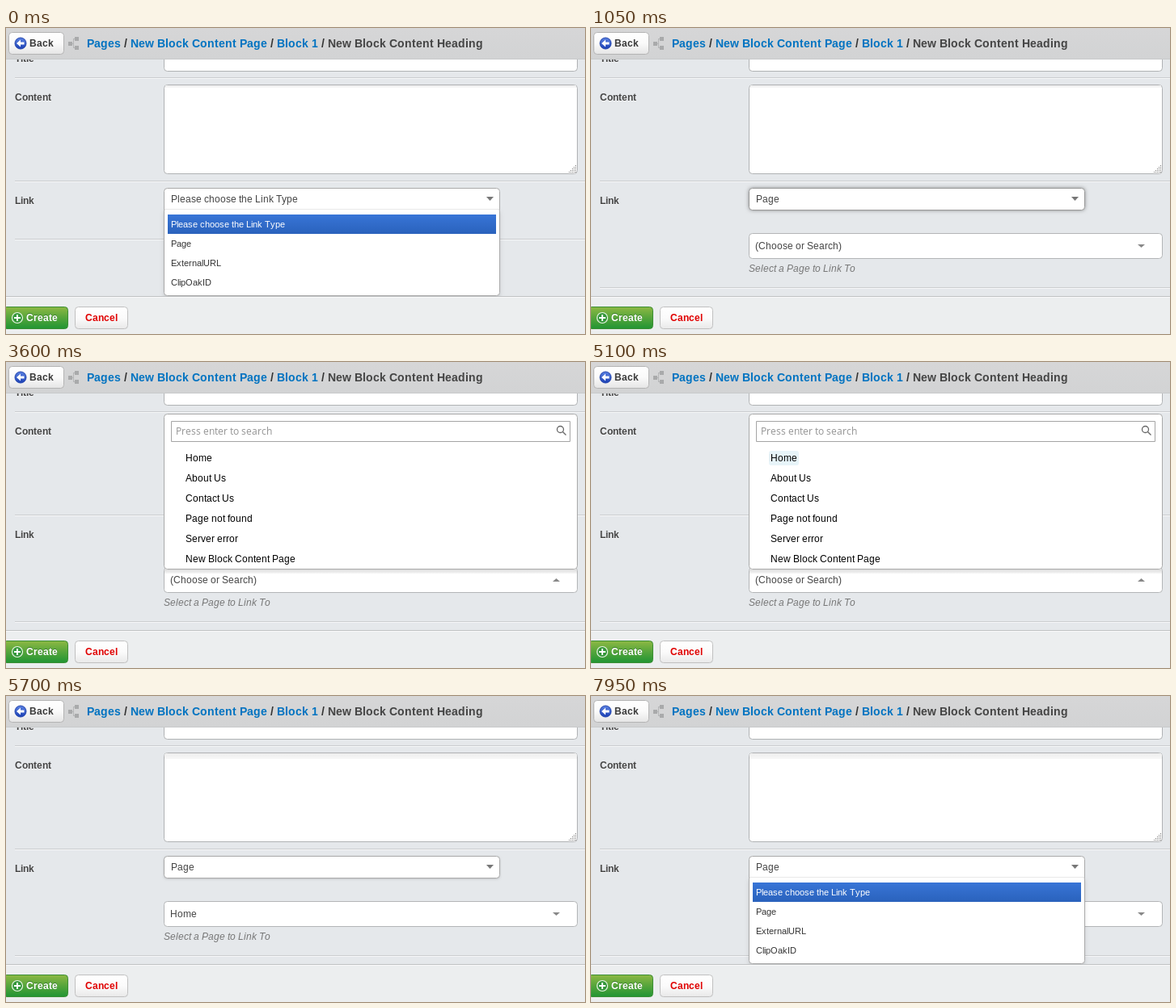
An HTML page with a canvas that plays this animation: 716x379 px, repeating every 8000 ms.

```html
<!DOCTYPE html>
<html lang="en">
<head>
<meta charset="utf-8">
<title>Link field</title>
<style>
html, body { margin: 0; width: 100%; height: 100%; overflow: hidden; background: #e5e8eb; }
canvas { display: block; }
</style>
</head>
<body>
<canvas id="stage" width="716" height="379"></canvas>
<script>
const ctx = document.getElementById('stage').getContext('2d');
const LOOP = 8000;
const SANS = '"Liberation Sans", Arial, sans-serif';
const OPEN = '"Open Sans", sans-serif';
const OPTIONS = ['Please choose the Link Type', 'Page', 'ExternalURL', 'ClipOakID'];
const PAGES = ['Home', 'About Us', 'Contact Us', 'Page not found', 'Server error', 'New Block Content Page'];

// Each step holds from its time until the next one.
const STEPS = [
  { at: 0, menu: 0, value: 0 },
  { at: 450, menu: 1, value: 0 },
  { at: 1050, value: 1, focus: true, page: '(Choose or Search)' },
  { at: 3600, value: 1, page: '(Choose or Search)', tree: -1 },
  { at: 4350, value: 1, page: '(Choose or Search)', tree: 4 },
  { at: 4500, value: 1, page: '(Choose or Search)', tree: 3 },
  { at: 4650, value: 1, page: '(Choose or Search)', tree: 2 },
  { at: 4800, value: 1, page: '(Choose or Search)', tree: 1 },
  { at: 4950, value: 1, page: '(Choose or Search)', tree: -1 },
  { at: 5100, value: 1, page: '(Choose or Search)', tree: 0 },
  { at: 5700, value: 1, page: 'Home', shaded: true },
  { at: 7500, menu: 1, value: 1, page: 'Home', shaded: true },
  { at: 7950, menu: 0, value: 1, page: 'Home', shaded: true }
];

function rect(x, y, w, h, color) {
  ctx.fillStyle = color;
  ctx.fillRect(x, y, w, h);
}

function fade(y0, y1, ...colors) {
  const g = ctx.createLinearGradient(0, y0, 0, y1);
  colors.forEach((c, i) => g.addColorStop(i / (colors.length - 1), c));
  return g;
}

function box(x, y, w, h, fill, border, radius = 4) {
  ctx.beginPath();
  ctx.roundRect(x + 0.5, y + 0.5, w - 1, h - 1, radius);
  ctx.fillStyle = fill;
  ctx.fill();
  ctx.shadowColor = 'transparent';
  if (border) {
    ctx.lineWidth = 1;
    ctx.strokeStyle = border;
    ctx.stroke();
  }
}

function shadow(color, blur, dy = 0) {
  ctx.shadowColor = color;
  ctx.shadowBlur = blur;
  ctx.shadowOffsetY = dy;
}

function shape(color, points) {
  ctx.beginPath();
  points.forEach(([x, y]) => ctx.lineTo(x, y));
  ctx.closePath();
  ctx.fillStyle = color;
  ctx.fill();
}

// Letters advance by whole pixels; returns the end position.
function text(str, x, y, color, style = '12px', family = SANS) {
  ctx.font = style + ' ' + family;
  ctx.fillStyle = color;
  for (const ch of str) {
    ctx.fillText(ch, x, y);
    x += Math.round(ctx.measureText(ch).width);
  }
  return x;
}

function textWidth(str) {
  ctx.font = '12px ' + SANS;
  return [...str].reduce((w, ch) => w + Math.round(ctx.measureText(ch).width), 0);
}

function label(str, y) {
  text(str, 11, y + 1, '#f8f9fa', 'bold 12px');
  text(str, 11, y, '#444', 'bold 12px');
}

function rule(y) {
  rect(11, y, 705, 1, '#cbcdcf');
  rect(11, y + 1, 705, 1, '#f6f7f8');
}

function arrow(x, y, w, h, color, up) {
  const [base, tip] = up ? [y + h, y] : [y, y + h];
  shape(color, [[x, base], [x + w, base], [x + w / 2, tip]]);
}

function header() {
  rect(0, 0, 716, 38, fade(0, 38, '#d6d6d7', '#d2d3d4'));
  rect(0, 38, 716, 1, '#c8cacb');
  box(3, 5, 69, 28, fade(5, 33, '#fff', '#fafafa', '#e4e4e4'), '#b4b4b4');
  ctx.beginPath();
  ctx.arc(18, 19, 7, 0, 7);
  ctx.fillStyle = fade(12, 26, '#5b82e2', '#1a3fb4');
  ctx.fill();
  ctx.lineWidth = 1;
  ctx.strokeStyle = '#2546ae';
  ctx.stroke();
  shape('#fff', [[13, 19], [18, 14.5], [18, 17.5], [22.5, 17.5], [22.5, 20.5], [18, 20.5], [18, 23.5]]);
  text('Back', 29, 23, '#393939', 'bold 12px');

  rect(77, 17, 5, 5, '#a9aaab');
  rect(85, 11, 5, 5, '#a9aaab');
  rect(85, 22, 5, 5, '#a9aaab');
  rect(82, 19, 2, 1, '#b4b5b6');
  rect(83, 13, 1, 12, '#b4b5b6');
  rect(83, 13, 2, 1, '#b4b5b6');
  rect(83, 24, 2, 1, '#b4b5b6');

  let x = 100;
  for (const crumb of ['Pages', 'New Block Content Page', 'Block 1']) {
    x = text(crumb, x, 24, '#0073c1', 'bold 14px');
    x = text(' / ', x, 24, '#333', 'bold 14px');
  }
  text('New Block Content Heading', x, 24, '#444', 'bold 14px');
}

function footer() {
  rect(0, 332, 716, 47, '#eceeef');
  rect(0, 332, 716, 1, '#bfc1c3');
  rect(0, 333, 716, 1, '#f9f9f9');
  box(-4, 345, 81, 28, fade(345, 373, '#8fb944', '#55a53b', '#1f9433'), '#3c8f35');
  ctx.beginPath();
  ctx.arc(14, 359, 6.5, 0, 7);
  ctx.fillStyle = '#35983a';
  ctx.fill();
  ctx.lineWidth = 1.2;
  ctx.strokeStyle = '#eaf5e6';
  ctx.stroke();
  rect(10, 358, 8, 2, '#fff');
  rect(13, 355, 2, 8, '#fff');
  text('Create', 25, 362, '#3b7d2c', 'bold 12px');
  text('Create', 25, 363, '#fff', 'bold 12px');
  box(85, 345, 66, 28, fade(345, 373, '#fff', '#fbfbfb', '#e8e8e8'), '#c0c0c0');
  text('Cancel', 98, 363, '#e00000', 'bold 12px');
}

function textarea(shaded) {
  box(195, 70, 512, 111, '#fff', '#b0b2b4');
  rect(197, 71, 508, 3, fade(71, 74, '#ececec', '#f8f8f8'));
  if (shaded) rect(196, 72, 510, 6, fade(72, 78, '#efefef', '#f8f8f8'));
  for (let row = 0; row < 5; row++)
    for (let col = 4 - row; col < 5; col++)
      rect(696 + col * 2, 170 + row * 2, 1, 1, '#777');
}

function select(step) {
  const open = step.menu !== undefined;
  if (step.focus) shadow('rgba(0,0,0,.45)', 5);
  else if (!open) shadow('rgba(0,0,0,.2)', 3, 1);
  box(195, 198, 416, open ? 34 : 28, '#fff', step.focus ? '#999' : '#aaa');
  if (open) menu(step.menu);
  text(OPTIONS[step.value], 204, 216, '#444');
  arrow(594, 209, 9, 5, '#777');
}

function menu(active) {
  shadow('rgba(0,0,0,.15)', 5, 4);
  box(195, 222, 416, 110, '#fff', '#aaa');
  rect(196, 218, 414, 6, '#fff');
  rect(196, 224, 414, 1, '#e9e9e9');
  OPTIONS.forEach((name, i) => {
    const y = 231 + i * 24;
    if (i === active) rect(200, y, 406, 24, fade(y, y + 24, '#3875d7', '#2a62bc'));
    text(name, 204, y + 16, i === active ? '#fff' : '#333', '11px');
  });
}

function pageField(step) {
  const open = step.tree !== undefined;
  box(195, 254, 512, 32, '#fff', '#b3b5b7');
  text(step.page, 203, 274, '#444');
  arrow(676, 268, 9, 4, '#888', open);
  text('Select a Page to Link To', 195, 302, '#777', 'italic 12px');
  if (open) tree(step.tree);
}

function tree(active) {
  rect(196, 257, 510, 5, fade(257, 262, '#dcdcdc', '#f6f6f6'));
  box(195, 64, 512, 193, '#fff', '#aaa');
  box(204, 73, 494, 26, '#fff', '#a5a5a5', 0);
  text('Press enter to search', 210, 90, '#949494', '12px', OPEN);
  ctx.beginPath();
  ctx.arc(685.5, 83.5, 4, 0, 7);
  ctx.moveTo(688.5, 86.5);
  ctx.lineTo(692.5, 90.5);
  ctx.lineWidth = 1.3;
  ctx.strokeStyle = '#666';
  ctx.stroke();
  PAGES.forEach((name, i) => {
    const y = 110 + i * 25;
    if (i === active) box(220, y, textWidth(name) + 4, 18, '#e7f4f9', '#e7f4f9', 2);
    text(name, 222, y + 13, '#000');
  });
}

function draw(t) {
  const step = STEPS.findLast(s => s.at <= t);
  rect(0, 0, 716, 379, '#e5e8eb');
  box(195, 22, 512, 32, '#fff', '#b0b2b4');
  label('Title', 42);
  rule(61);
  label('Content', 90);
  textarea(step.shaded);
  rule(189);
  label('Link', 218);
  rule(step.page ? 321 : 261);
  if (step.page) pageField(step);
  // The open tree leaves the type selector underneath.
  if (step.tree === undefined) select(step);
  header();
  footer();
}

function tick(now) {
  draw(now % LOOP);
  requestAnimationFrame(tick);
}

draw(0);
requestAnimationFrame(tick);
</script>
</body>
</html>
```
